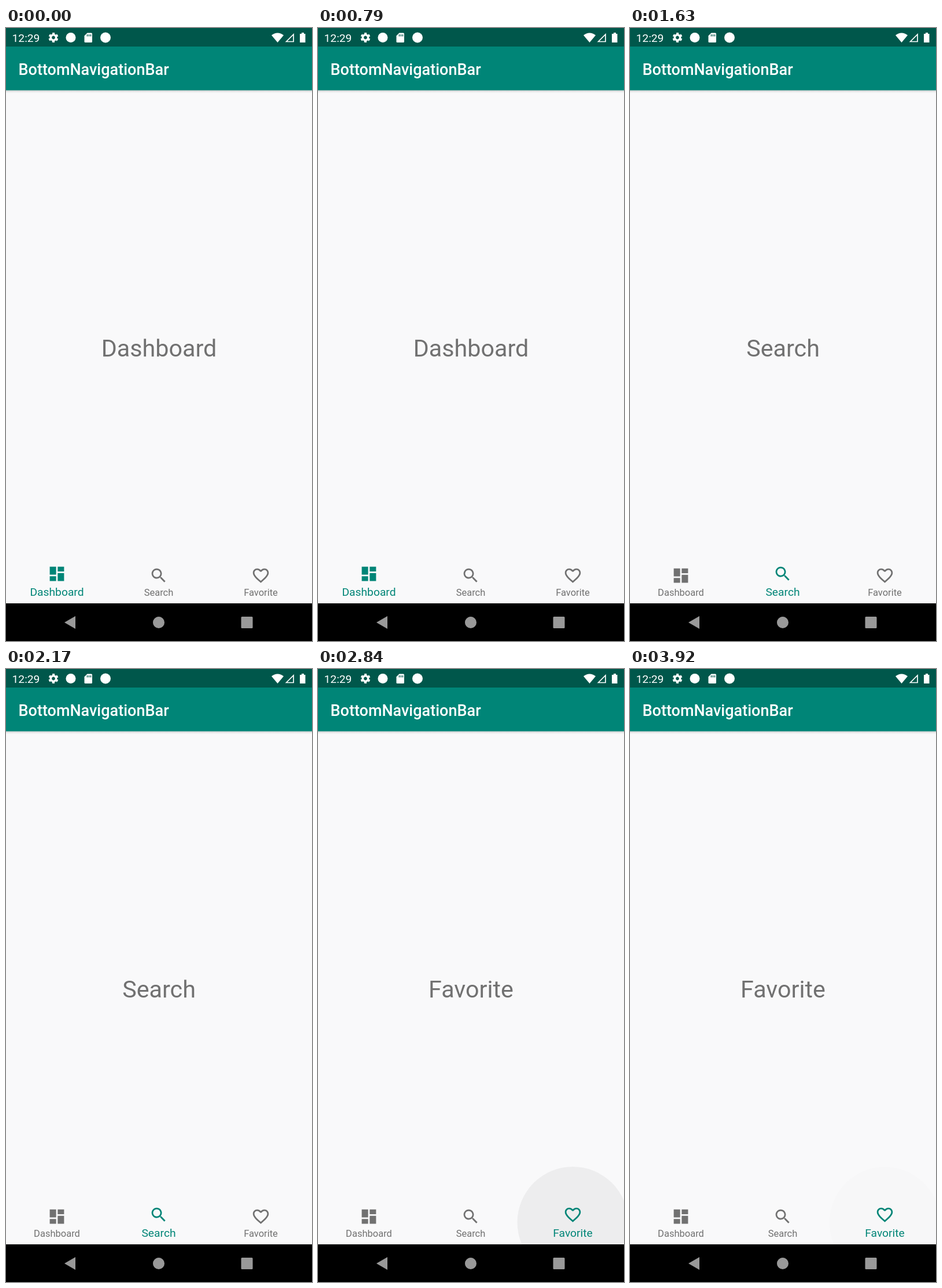
An HTML page that plays this animation: 529 px wide and 1058 px high, repeating every 3960 ms.

```html
<!DOCTYPE html>
<html lang="en">
<head>
<meta charset="utf-8">
<title>Bottom navigation</title>
<style>
  html, body { margin: 0; width: 100%; height: 100%; overflow: hidden; background: #f9f9fa; }
  svg { display: block; width: 100%; height: 100%; font-family: Roboto, "Noto Sans", sans-serif; }
</style>
</head>
<body>
<svg viewBox="0 0 529 1058">
  <defs>
    <linearGradient id="shade" x2="0" y2="1">
      <stop stop-opacity=".17"/>
      <stop offset="1" stop-opacity="0"/>
    </linearGradient>
  </defs>

  <rect width="529" height="1058" fill="#f9f9fa"/>
  <rect y="107" width="529" height="5" fill="url(#shade)"/>
  <rect y="32" width="529" height="75.5" fill="#008577"/>
  <rect width="529" height="32" fill="#00574b"/>
  <text x="21.5" y="81" font-size="27" font-weight="500" fill="#fff">BottomNavigationBar</text>

  <!-- status bar -->
  <g fill="#fff">
    <text x="10.5" y="23.5" font-size="19.25">12:29</text>
    <g transform="translate(82 16.5) rotate(-90)" fill="none" stroke="#fff">
      <circle r="4.7" stroke-width="3.6"/>
      <circle r="7" stroke-width="3" stroke-dasharray="4 3.33" stroke-dashoffset="2"/>
    </g>
    <circle cx="112" cy="16.5" r="8.5"/>
    <path d="M140.500 8.500H147.500Q149 8.500 149 10V23.500Q149 25 147.500 25H137Q135.500 25 135.500 23.500V13.500Z"/>
    <path d="M140.500 11v3.500M143.500 11v3.500M146.500 11v3.500" stroke="#00574b" stroke-width="1.4"/>
    <circle cx="172" cy="16.500" r="9"/>
    <path d="M459 12.500Q469.500 4.500 480 12.500L469.500 25Z"/>
    <path d="M484.500 23.500L497 11V23.500Z" fill="none" stroke="#fff" stroke-width="1.7"/>
    <path d="M511 8h4v2h2.500v15h-9.500V10h3Z"/>
  </g>

  <circle id="ripple"/>
  <text id="page" x="264.5" y="566.5" font-size="41.25" text-anchor="middle" fill="#717171"></text>
  <g id="tabs"></g>

  <!-- system navigation -->
  <rect y="993" width="529" height="65" fill="#000"/>
  <g fill="#999">
    <path d="M101 1026L120 1015V1037Z"/>
    <circle cx="264" cy="1026" r="10"/>
    <rect x="406.500" y="1016" width="20" height="20" rx="1.500"/>
  </g>
</svg>
<script>
const LOOP = 3960, DP = 1.375, MAX_RADIUS = 96;
const ACTIVE = '#008577', IDLE = '#717171';

const tabs = [
  { name: 'Dashboard', x: 88, icon: 'M3 13h8V3H3zm0 8h8v-6H3zm10 0h8V11h-8zm0-18v6h8V3z' },
  { name: 'Search', x: 264, icon: 'M15.5 14h-.79l-.28-.27C15.41 12.59 16 11.11 16 9.5 16 5.91 13.09 3 9.5 3S3 5.91 3 9.5 5.91 16 9.5 16c1.61 0 3.09-.59 4.23-1.57l.27.28v.79l5 4.99L20.49 19zm-6 0C7.01 14 5 11.99 5 9.5S7.01 5 9.5 5 14 7.01 14 9.5 11.99 14 9.5 14z' },
  { name: 'Favorite', x: 440.5, icon: 'M16.5 3c-1.74 0-3.41.81-4.5 2.09C10.91 3.81 9.24 3 7.5 3 4.42 3 2 5.42 2 8.5c0 3.78 3.4 6.86 8.55 11.54L12 21.35l1.45-1.32C18.6 15.36 22 12.28 22 8.5 22 5.42 19.58 3 16.5 3zm-4.4 15.55l-.1.1-.1-.1C7.14 14.24 4 11.39 4 8.5 4 6.5 5.5 5 7.5 5c1.54 0 3.04.99 3.57 2.36h1.87C13.46 5.99 14.96 5 16.5 5c2 0 3.5 1.5 3.5 3.5 0 2.89-3.14 5.74-7.9 10.05z' }
];

// rest: faint trace the ripple leaves behind
const taps = [
  { tab: 1, start: 1099, select: 1240, x: 251, y: 966, rest: 0 },
  { tab: 2, start: 2514, select: 2660, x: 426, y: 937, rest: .06 }
];

const $ = id => document.getElementById(id);
const clamp = v => Math.min(1, Math.max(0, v));
const mix = (a, b, k) => a + (b - a) * k;

// cubic-bezier(.4, 0, .2, 1)
function ease(x) {
  let lo = 0, hi = 1;
  for (let i = 0; i < 20; i++) {
    const u = (lo + hi) / 2, v = 1 - u;
    if (1.2 * v * v * u + .6 * v * u * u + u * u * u < x) lo = u; else hi = u;
  }
  return lo * lo * (3 - 2 * lo);
}

function add(parent, tag, attrs) {
  const el = document.createElementNS('http://www.w3.org/2000/svg', tag);
  set(el, attrs);
  return parent.appendChild(el);
}

function set(el, attrs) {
  for (const key in attrs) el.setAttribute(key, attrs[key]);
}

for (const tab of tabs) {
  tab.group = add($('tabs'), 'g', {});
  tab.image = add(tab.group, 'path', { d: tab.icon });
  tab.label = add(tab.group, 'text', { 'text-anchor': 'middle' });
  tab.label.textContent = tab.name;
}

function drawRipple(tap, t) {
  if (!tap) return set($('ripple'), { opacity: 0 });
  const age = t - tap.start, k = ease(clamp(age / 225));
  const fade = mix(1, tap.rest, clamp((age - 225) / 150));
  set($('ripple'), {
    cx: mix(tap.x, tabs[tap.tab].x, k),
    cy: mix(tap.y, 955, k),
    r: MAX_RADIUS * mix(.3, 1, k),
    opacity: .13 * clamp(age / 105) * fade
  });
}

function draw(t) {
  drawRipple(taps.filter(tap => t >= tap.start).pop(), t);

  const chosen = taps.filter(tap => t >= tap.select).pop();
  const now = chosen ? chosen.tab : 0;
  const before = now - 1;
  const k = chosen ? ease(clamp((t - chosen.select - 10) / 115)) : 1;
  $('page').textContent = tabs[now].name;

  tabs.forEach((tab, i) => {
    const on = i === now ? k : i === before ? 1 - k : 0;
    const moving = i === now || i === before;
    set(tab.group, { fill: i === now ? ACTIVE : IDLE });
    set(tab.image, { transform: `translate(${tab.x - 12 * DP} ${mix(945, 942, on) - 12 * DP}) scale(${DP})` });
    set(tab.label, {
      transform: `translate(${tab.x} 980)`,
      'font-size': mix(12, 14, on) * DP,
      opacity: moving ? k : 1
    });
  });
}

const origin = performance.now();
function tick() {
  draw((performance.now() - origin) % LOOP);
  requestAnimationFrame(tick);
}
tick();
</script>
</body>
</html>
```
